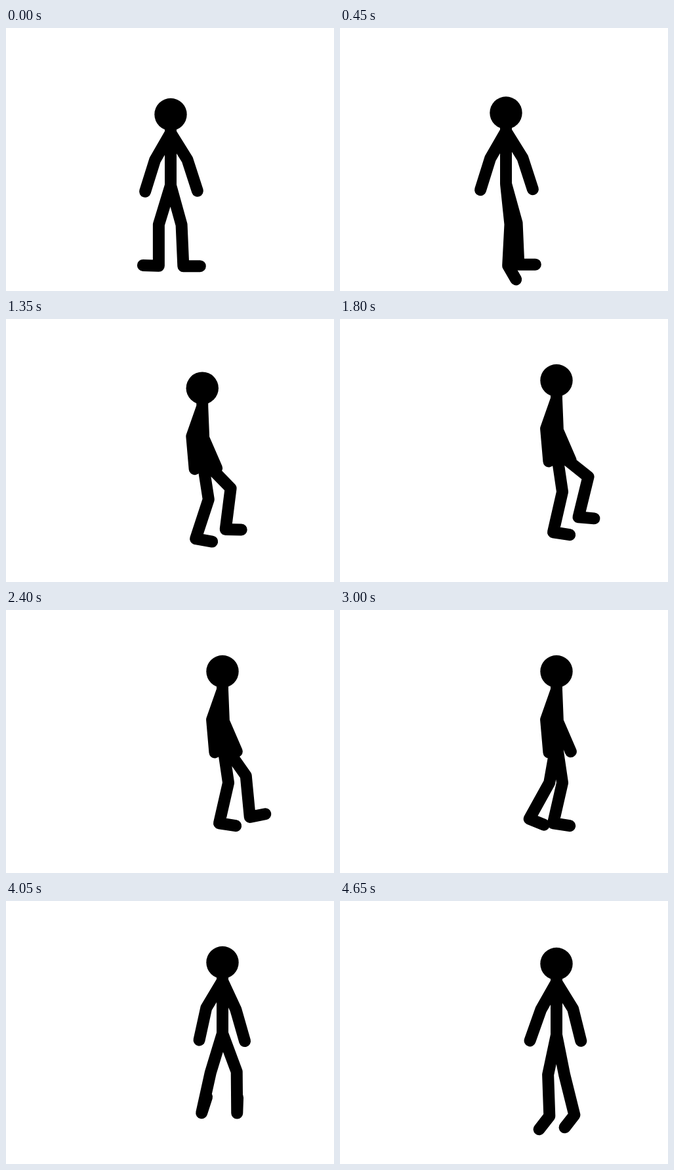
Animation, 500 px wide and 400 px high, one loop 4.8 s. Source, as an HTML page:

```html
<!DOCTYPE html>
<html lang="en">
<head>
<meta charset="utf-8">
<title>Stick figure walk</title>
<style>
  html, body { margin: 0; width: 100%; height: 100%; overflow: hidden; background: #fff; }
  svg { display: block; width: 500px; height: 400px; }
  path { fill: none; stroke: #000; stroke-width: 18; stroke-linecap: round; stroke-linejoin: round; }
</style>
</head>
<body>
<svg viewBox="0 0 500 400">
  <path id="limbs"/>
  <circle id="head" r="24.7"/>
</svg>
<script>
const STEP = 150, STEPS = 32;
const NECK = 28, HIP = 108;
const ARM = [48, 50], SWING_LEG = [62, 63, 24], STAND_LEG = [62, 63, 25.5];

// A pose holds the head position and, per limb, segment angles in degrees clockwise from right.
// Every pose inherits what it does not change.
const front = {
  head: [251, 131.5], left: [120, 107.4], right: [58, 72],
  swing: [107, 90, 182], stand: [74.5, 87.5, 0]
};
const turn = { ...front, head: [253, 129], swing: [84, 93, 60] };
const side = {
  head: [268, 116.5], left: [109.4, 85], right: [87.7, 66.5],
  swing: [61.8, 98, 0], stand: [74, 96.3, 4]
};
const stepUp = { ...side, head: [289, 109], swing: [48, 95, 0], stand: [81, 110, 10] };
const lift = { ...side, head: [330, 93.5], swing: [38.5, 103.8, 5], stand: [81.6, 102.9, 9] };
const reach = { ...lift, swing: [54.8, 84.5, -11] };
const back = { ...lift, swing: [100, 119, 22] };
const facing = {
  ...lift, left: [121, 102.4], right: [65, 74],
  swing: [69.5, 89.5, -88], stand: [107, 102.5, -72]
};
const settle = {
  head: [330, 95.5], left: [119.6, 109.5], right: [58.3, 76],
  swing: [78.7, 76, -232], stand: [102, 88, -232]
};

const timeline = [
  [0, front], [3, turn], [6, side], [8, stepUp], [12, lift], [13, lift],
  [16, reach], [20, back], [24, reach], [27, facing], [31, settle]
];

const limbs = document.getElementById("limbs");
const head = document.getElementById("head");

function poseAt(step) {
  const next = Math.max(1, timeline.findIndex(([at]) => at >= step));
  const [[startAt, from], [endAt, to]] = timeline.slice(next - 1, next + 1);
  const k = (step - startAt) / (endAt - startAt);
  const pose = {};
  for (const part in from) {
    pose[part] = from[part].map((v, i) => v + (to[part][i] - v) * k);
  }
  return pose;
}

function chain(x, y, lengths, angles) {
  let d = `M${x} ${y}`;
  lengths.forEach((length, i) => {
    const angle = angles[i] * Math.PI / 180;
    x += length * Math.cos(angle);
    y += length * Math.sin(angle);
    d += `L${x.toFixed(2)} ${y.toFixed(2)}`;
  });
  return d;
}

function draw(time) {
  const pose = poseAt(Math.floor(time / STEP) % STEPS);
  const [x, y] = pose.head;
  const neck = y + NECK, hip = y + HIP;
  head.setAttribute("cx", x);
  head.setAttribute("cy", y);
  limbs.setAttribute("d",
    `M${x} ${y}V${hip}` +
    chain(x, neck, ARM, pose.left) +
    chain(x, neck, ARM, pose.right) +
    chain(x, hip, SWING_LEG, pose.swing) +
    chain(x, hip, STAND_LEG, pose.stand));
}

const start = performance.now();
function tick() {
  draw(performance.now() - start);
  requestAnimationFrame(tick);
}
tick();
</script>
</body>
</html>
```
